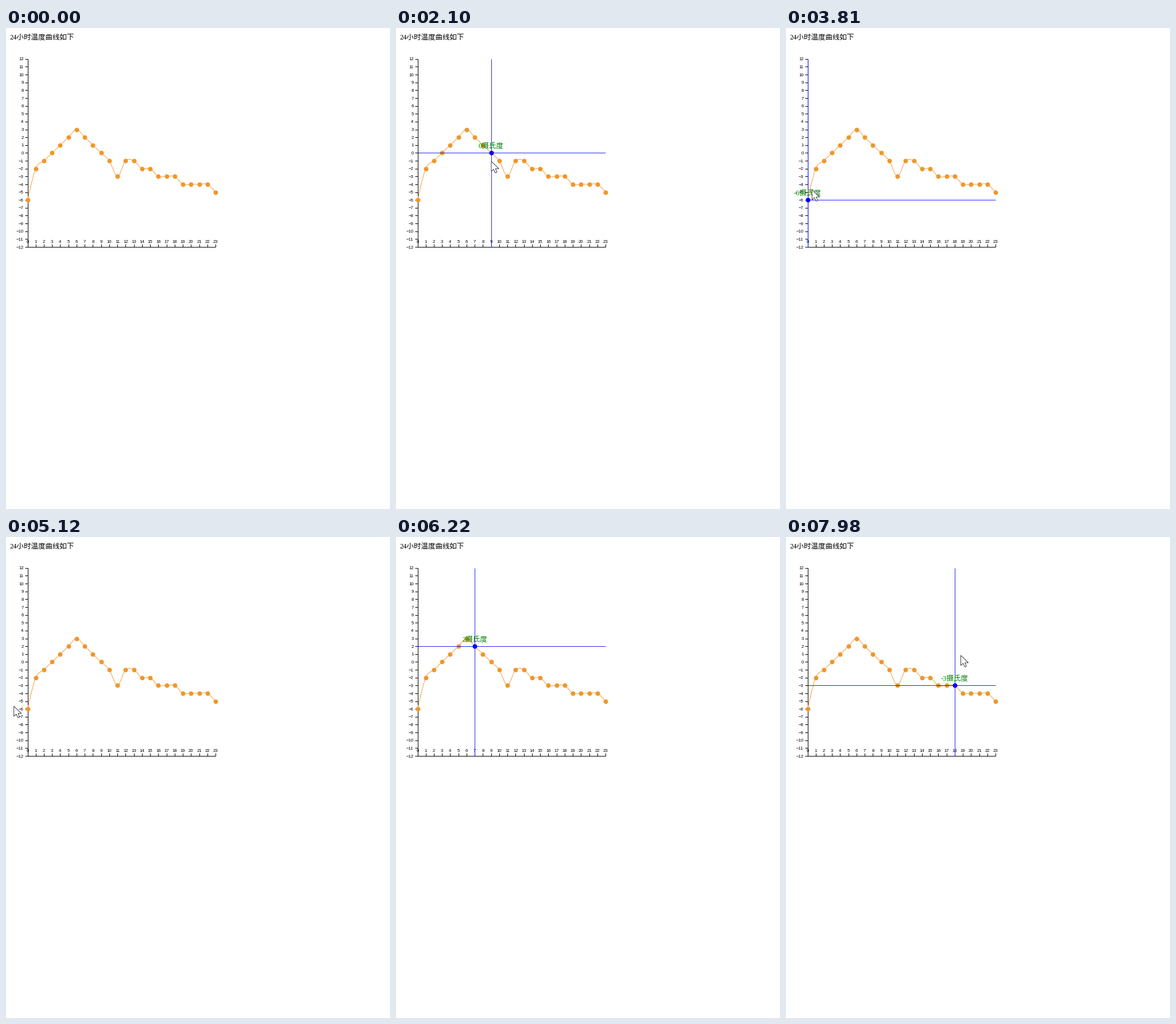
A matplotlib script that plays this animation: 669 by 837 pixels, repeating every 8000 ms.

```python
import math

import matplotlib.pyplot as plt
import numpy as np
from matplotlib.animation import FuncAnimation
from matplotlib.patches import PathPatch, Polygon
from matplotlib.path import Path

W, H = 669, 837
DPI = 64               # a power of two keeps the pixel size exact
LOOP, STEP = 8000, 20
PT = 72 / DPI          # points per pixel
ZOOM = 0.78            # page zoom of the chart
LEFT, RIGHT, TOP, BOTTOM = 37.5, 365.0, 53.8, 381.0
ORANGE = "#ef972a"
TEMPS = [-6, -2, -1, 0, 1, 2, 3, 2, 1, 0, -1, -3,
         -1, -1, -2, -2, -3, -3, -3, -4, -4, -4, -4, -5]

# Pointer moves: start ms, end ms, steps, end position
START = (625, 260)
MOVES = [
    (180, 560, 10, (303, 215)),
    (1140, 1380, 8, (226, 225)),
    (1730, 2100, 10, (166, 232)),
    (2370, 2660, 10, (105, 205)),
    (2960, 3740, 22, (45.5, 281)),
    (3770, 3970, 6, (43, 285)),
    (4220, 4370, 5, (11.5, 296)),
    (5120, 5620, 13, (142, 200)),
    (5810, 6220, 10, (141, 206)),
    (6600, 7380, 25, (303, 208)),
    (7410, 7450, 2, (303.5, 207.5)),
    (7760, 7980, 8, (304.5, 206)),
]
POINTER_HIDDEN = [(0, 180), (560, 1160), (6200, 6600)]
ARROW = np.array([(0, 0), (0, 17.5), (4.1, 13.8), (7, 20.2),
                  (9.9, 18.9), (7.2, 12.8), (13.2, 12.8)])


def x_of(hour):
    return LEFT + hour * (RIGHT - LEFT) / 23


def y_of(temp):
    return BOTTOM - (temp + 12) * (BOTTOM - TOP) / 24


POINTS = np.array([(x_of(h), y_of(t)) for h, t in enumerate(TEMPS)])

fig = plt.figure(figsize=(W / DPI, H / DPI), dpi=DPI, facecolor="white")
ax = fig.add_axes([0, 0, 1, 1])
ax.set_xlim(0, W)
ax.set_ylim(H, 0)
ax.axis("off")


def write(x, y, text, size, ha, color="black", serif=False, z=2):
    family = ["Liberation Serif", "Noto Sans CJK JP"] if serif else "Liberation Sans"
    return ax.text(x, y, text, fontsize=size * ZOOM * PT, family=family,
                   ha=ha, va="baseline", color=color, zorder=z)


def line(xs, ys, color="black", z=1):
    return ax.plot(xs, ys, color=color, lw=PT, solid_capstyle="butt", zorder=z)[0]


def dots(points, color, z):
    return ax.plot(points[:, 0], points[:, 1], "o", color=color,
                   ms=7.9 * PT, mew=0, zorder=z)[0]


def cardinal(points):
    """Smooth path through all points, with flat handles at both ends."""
    p = np.vstack([points[:1], points, points[-1:]])
    verts, codes = [points[0]], [Path.MOVETO]
    for i in range(1, len(p) - 2):
        first, last = i == 1, i == len(p) - 3
        out = p[i] if first else p[i] + (p[i + 1] - p[i - 1]) / 6
        back = p[i + 1] if last else p[i + 1] - (p[i + 2] - p[i]) / 6
        verts += [out, back, p[i + 1]]
        codes += [Path.CURVE4] * 3
    return Path(verts, codes)


def draw_chart():
    write(6.2, 19.6, "24小时温度曲线如下", 16, "left", serif=True)
    line([LEFT, LEFT], [TOP, BOTTOM])
    line([LEFT, RIGHT], [BOTTOM, BOTTOM])
    for temp in range(-12, 13):
        y = y_of(temp)
        line([LEFT - 5, LEFT], [y, y])
        write(30.7, y + 2.6, str(temp).replace("-", "\u2212"), 10, "right")
    for hour in range(24):
        x = x_of(hour)
        line([x, x], [BOTTOM - 5, BOTTOM])
        write(x, 374, str(hour), 10, "center")
    ax.add_patch(PathPatch(cardinal(POINTS), fill=False, ec=ORANGE,
                           lw=0.9 * PT, zorder=3))
    dots(POINTS, ORANGE, 4)


draw_chart()
v_line = line([LEFT, LEFT], [TOP, BOTTOM], "blue", 5)
h_line = line([LEFT, RIGHT], [TOP, TOP], "blue", 5)
for guide in (v_line, h_line):
    guide.set_alpha(0.85)
marker = dots(POINTS[:1], "blue", 6)
label = write(0, 0, "", 16, "center", "green", serif=True, z=7)
pointer = ax.add_patch(Polygon(ARROW, closed=True, fc="white", ec="#2b2b35",
                               lw=0.9 * PT, zorder=8))
cross = (v_line, h_line, marker, label)


def pointer_at(ms):
    pos = np.array(START, float)
    for begin, end, steps, goal in MOVES:
        if ms < begin:
            break
        done = min(math.floor((ms - begin) * (steps - 1) / (end - begin)) + 1, steps)
        u = done / steps
        pos += (np.array(goal) - pos) * u * u * (3 - 2 * u)
    return pos


def update(frame):
    ms = frame * STEP
    pos = pointer_at(ms)
    pointer.set_xy(ARROW + pos)
    pointer.set_visible(not any(a <= ms < b for a, b in POINTER_HIDDEN))

    inside = LEFT <= pos[0] <= RIGHT
    for part in cross:
        part.set_visible(inside)
    if inside:
        hour = int((pos[0] - LEFT) / (RIGHT - LEFT) * 23)
        x, y = POINTS[hour]
        v_line.set_xdata([x, x])
        h_line.set_ydata([y, y])
        marker.set_data([x], [y])
        label.set_position((x, y - 10 * ZOOM))
        label.set_text(f"{TEMPS[hour]}摄氏度")
    return (*cross, pointer)


anim = FuncAnimation(fig, update, frames=LOOP // STEP, interval=STEP,
                     repeat=True, repeat_delay=0, blit=False)
plt.show()
```
